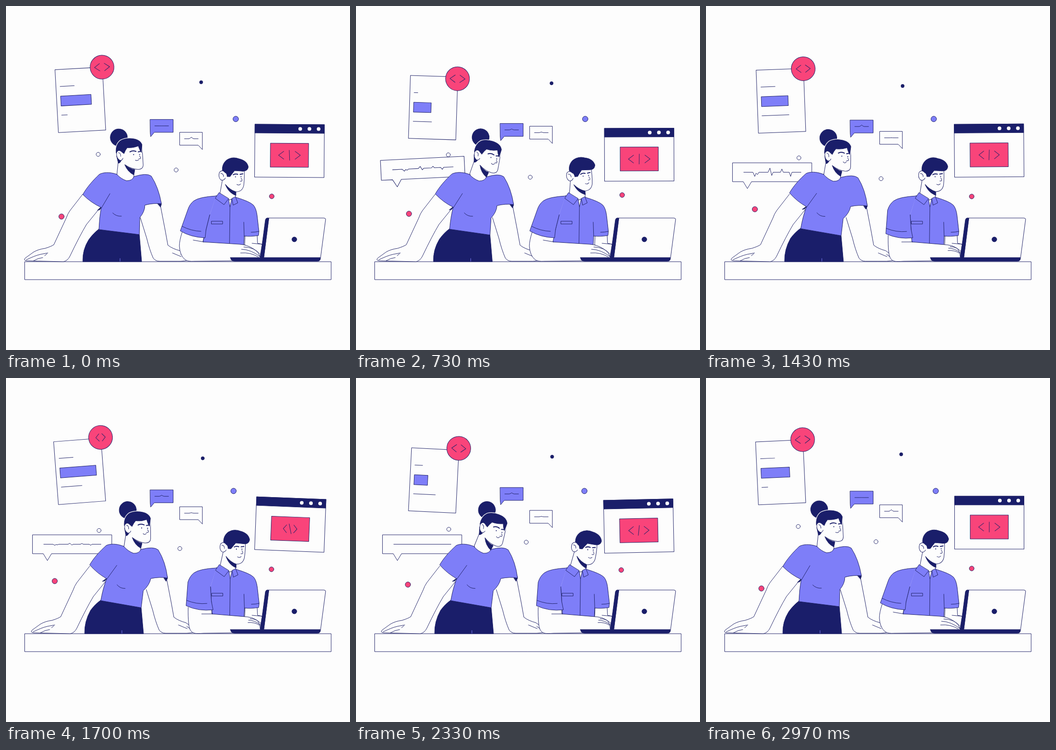
An HTML page with a canvas for the animation above (3010 ms loop, 748x748 px).

```html
<!DOCTYPE html>
<html lang="en">
<head>
<meta charset="utf-8">
<title>Team at work</title>
<style>
  html, body { margin: 0; width: 100%; height: 100%; overflow: hidden; background: #fdfdfd; }
  canvas { display: block; }
</style>
</head>
<body>
<canvas id="stage" width="748" height="748"></canvas>
<script>
const LOOP = 3010, TAU = Math.PI * 2;
const PAPER = '#fdfdfd', NAVY = '#1a1e6a', LINE = '#202368', VIOLET = '#7e7ef8', RED = '#f9447a';
const g = document.getElementById('stage').getContext('2d');
g.lineJoin = g.lineCap = 'round';
let t = 0;

// Timing: waves that fit the loop, and eased steps between two times.
const wave = (cycles, peak = 0) => Math.cos(TAU * cycles * (t - peak) / LOOP);
const clamp = u => Math.min(1, Math.max(0, u));
const smooth = u => (u = clamp(u), u * u * (3 - 2 * u));
const ramp = (from, to) => smooth((t - from) / (to - from));

// Moves every point of an absolute path.
const bend = (d, move) =>
  d.replace(/([\d.]+) ([\d.]+)/g, (_, x, y) => move(+x, +y).map(v => v.toFixed(2)).join(' '));

function draw(d, fill, stroke = LINE, width = 1) {
  const p = new Path2D(d);
  if (fill) { g.fillStyle = fill; g.fill(p); }
  if (stroke) { g.strokeStyle = stroke; g.lineWidth = width; g.stroke(p); }
}
const box = (x, y, w, h, fill) => draw(`M${x} ${y}h${w}v${h}h${-w}Z`, fill);
function dot(x, y, r, fill, stroke = LINE) {
  g.beginPath();
  g.arc(x, y, r, 0, TAU);
  g.fillStyle = fill;
  g.fill();
  if (stroke) { g.strokeStyle = stroke; g.lineWidth = 1; g.stroke(); }
}
function group(x, y, deg, scale, body) {
  g.save();
  g.translate(x, y);
  g.rotate(deg * Math.PI / 180);
  g.scale(scale, scale);
  body();
  g.restore();
}
const shift = (x, body) => group(x, 0, 0, 1, body);
const turn = (x, y, dx, dy, deg, body) =>
  group(x + dx, y + dy, deg, 1, () => { g.translate(-x, -y); body(); });

// Angle brackets that close and open four times per loop.
function brackets(inner, outer, y, h) {
  const s = .67 + .36 * wave(4);
  for (const k of [-s, s])
    draw(`M${inner * k} ${y - h}L${outer * k} ${y}L${inner * k} ${y + h}`);
}

function documentCard() {
  group(114, 281.7 - 7 * wave(2, 100), -.5 - 3.9 * wave(2, 200), 1, () => {
    box(0, -137, 103, 137, PAPER);
    draw(`M9 -100h${31 - 29 * Math.max(0, wave(2, 570))}`);
    box(9, -79, 51 + 28 * wave(2, 240), 21.5, VIOLET);
    draw(`M9 -37.5h${37 - 24.5 * wave(3)}`);
    g.translate(102.5, -137 + 4 * wave(1, LOOP / 4));
    dot(0, 0, 26, RED);
    brackets(5, 16, 0, 8);
  });
}

function browser() {
  const deg = 2.7 * wave(2, 340);
  group(616, 376.5 - 5 * wave(2, 1350), deg, 1, () => {
    box(-75.5, -115, 151, 115, PAPER);
    box(-75.5, -115, 151, 19, NAVY);
    for (const x of [23, 43, 63]) dot(x, -105.5, 4, PAPER, null);
    box(-41.5, -74, 83, 52, RED);
    brackets(12, 23, -48, 8.5);
    group(0, -48, -6 * deg, 1, () => draw('M0 -11V11'));
  });
}

function chat(x, y, outline, fill, bump) {
  const h = 3.5 * bump;
  group(x, y, 0, 1, () => {
    draw(outline, fill);
    draw(`M10 14H20Q23 ${14 - h / 3} 25 ${14 - h}Q27 ${14 - h / 3} 30 14H40`);
  });
}

function chats() {
  const swing = wave(1, LOOP / 4), bump = (1 - wave(3)) / 2;
  chat(313.5, 246.7 + 8.7 * swing, 'M0 0H50V28H9L1 37.5L0 28Z', VIOLET, bump);
  chat(378, 274.7 - 13.3 * swing, 'M0 0H49V37.5L40 28H0Z', PAPER, 1 - bump);
}

function pulseBubble() {
  const hump = Math.sin(Math.PI * clamp((t - 190) / 660));
  const size = (ramp(190, 380) - ramp(2380, 2600)) * (1 + .11 * hump);
  if (size < .01) return;
  const a = ramp(600, 880) - ramp(1500, 1800);
  group(144 + 2 * hump, 361.5 - 16 * hump, -5.2 * hump, size, () => {
    draw('M-86 -20.5H86V20.5H-45L-54 35.5L-63 20.5H-86Z', PAPER);
    g.beginPath();
    g.rect(-64, -15, 127 * ramp(200, 620), 30);
    g.clip();
    draw(`M-62 0H-42L-38 ${9 * a}L-35 ${2 * a}L-32 ${5 * a}L-29 0H-9L-5 ${-9 * a}`
      + `L-1 ${7 * a}L2 0H18L21 ${-7 * a}L24 0H37L40 ${9 * a}L43 0H63`);
  });
}

function drift(x, y, dx, dy, peak, r, fill) {
  const w = wave(1, peak);
  dot(x + dx * w, y + dy * w, r, fill);
}
function dots() {
  drift(426, 170, 1.8, 4.6, 1700, 3.6, NAVY);
  drift(497.3, 245.7, 2.5, 0, 200, 6, VIOLET);
  drift(577.7, 414.3, -1, 3.3, 2200, 5.2, RED);
  drift(113.3, 449.7, 7.5, 8.3, 100, 5.8, RED);
  drift(201.3, 326.7, 1, 5, 1800, 4.4, PAPER);
  drift(375, 365.5, 6.5, 11.5, 1180, 4.4, PAPER);
}

function eyes(points) {
  const shut = t > 370 && t < 510;
  for (const [x, y] of points) {
    if (shut) draw(`M${x - 4} ${y}Q${x} ${y + 1} ${x + 4} ${y - 1}`);
    else dot(x, y, 1.1, NAVY, null);
  }
}

function woman() {
  const p = ramp(150, 1580) - ramp(2350, 2800);
  // The torso leans above the waist and tilts a little.
  const lean = (x, y) => [
    x + p * (4 + 11 * smooth((490 - y) / 80)),
    y + (y < 520 ? p * .05 * (x - 240) : 0)
  ];
  const body = (d, fill, stroke) => draw(bend(d, lean), fill, stroke);
  const head = parts => turn(260, 370, 15 * p, 2 * p, 7 - 7 * wave(2, 100) + 3 * p, parts);

  shift(15 * p, () => {
    draw('M167 409L139 445Q134 452 131 461L104 519Q98 523 85 527Q70 529 60 535L42 548Q37 553 45 554L125 556Q134 554 139 544Q160 500 175 475L205 438', PAPER);
    draw('M44 552Q62 543 75 540L91 537M60 554Q70 548 80 547M84 543L89 539');
  });
  shift(13 * p, () => {
    draw('M335 430L346 487L352 520Q362 528 378 532L396 545L400 553L380 555L334 555Q325 555 320 548Q312 530 306 505L292 460', PAPER);
    draw('M362 537L381 545M380 540L394 550');
  });
  body('M199 444L208 436L204 443ZM330 430L337 426L338 431L336 437Z', NAVY);

  head(() => draw('M244 335L241 368L250 384H274L278 372V352', PAPER));

  body('M202 485L290 497L295 556L167 556Q166 530 180 508Q190 494 202 485Z', NAVY);
  body('M248 549L248 555', null, VIOLET);
  body('M241 366C225 360 210 362 203 366C190 378 175 395 167 410Q185 428 207 438Q203 460 202 486L290 497L291 460Q302 447 302 433Q320 428 338 430Q332 395 316 370Q306 362 278 371Q275 380 262 380Q250 376 241 366Z', VIOLET);
  body('M226 408L207 440M232 450Q240 458 251 457');

  head(() => {
    draw('M258 345Q268 354 280 356L278 367Q264 360 258 345Z', NAVY);
    dot(244.5, 286, 18.6, NAVY);
    draw('M244 310L290 300L295 305Q296 318 297 330L298 345Q298 355 286 355Q271 354 258 345L248 338Z', PAPER, null);
    draw('M295 305Q296 318 297 330L298 345Q298 355 286 355Q271 354 258 345');
    const hair = 'M239 320Q237 302 248 293Q258 287 272 288Q290 289 295 301L294 318Q290 313 287 304Q275 309 263 308Q259 313 256 321L252 318Q244 312 239 320Z';
    draw(hair, null, PAPER, 3.5);
    draw(hair, NAVY);
    draw('M240 326L244 342Q248 342 251 334Z', NAVY);
    draw('M253 319Q244 310 240 319Q239 332 248 336Q252 336 254 331', PAPER);
    draw('M244 319Q249 320 249 327');
    draw('M269 317Q275 313 282 316M287 317L293 315.5', null, NAVY, 2);
    eyes([[277, 323], [290, 323]]);
    draw('M290 326Q294 330 291 332H288');
    draw(`M281 335Q285 ${338.5 - 1.5 * wave(3)} 288 334`);
  });
}

function man() {
  const q = ramp(900, 1350) - ramp(2400, 2850);
  const deg = -5.8 * wave(1, LOOP / 4), sway = deg * .2;
  // The elbow draws in while the hand slides under the screen.
  const tuck = (x, y) => {
    if (x > 500 && y < 547) return [x + q * .35 * (556 - x), y + q * .35 * (522 - y)];
    const dx = q * smooth((520 - x) / 90) * 20 * clamp((y - 450) / 64);
    return [x + dx, Math.min(Math.max(y, 555), y + dx * .5 * smooth((430 - x) / 50))];
  };
  const arm = (d, fill) => draw(bend(d, tuck), fill);
  const head = parts => turn(482, 410, sway, 0, deg, parts);

  head(() => draw('M471 376L465 409L484 422L499 418V400', PAPER));
  draw('M520 497L519 519L552 547L557 518L547 516L546 497', PAPER);
  draw('M535 516L557 518');

  shift(sway, () => {
    draw(bend('M443 454L428 514', tuck) + 'L517 519L518 500Q530 502 549 499L550 490L546 455Q544 440 538 433Q530 425 500 416L491 419L487 437L484 419Q470 422 457 412', VIOLET);
    draw('M487 437L486 518M517 470L518 501M447 468H471V474H447ZM533 492Q542 492 550 490');
  });

  arm('M383 492Q377 510 377 522Q378 543 390 552Q396 556 410 555L495 554L553 548Q550 535 538 528Q524 519 508 518L428 513L431 500', PAPER);
  arm('M407 509L430 513M512 529Q532 529 554 546M510 537Q532 535 549 546M517 524Q540 524 554 541');

  shift(sway, () => {
    arm('M457 413Q420 415 408 424Q399 431 395 444L379 489Q402 503 433 504L435 486L443 454', VIOLET);
    arm('M383 479Q402 489 424 490');
    draw('M463 406L455 418L474 432L484 419ZM491 419L494 433L504 428L499 415Z', VIOLET);
  });

  head(() => {
    draw('M477 388Q486 400 500 404V412Q484 406 477 388Z', NAVY);
    draw('M474 358L518 354Q520 372 517 390Q514 404 500 404Q487 400 477 388Z', PAPER, null);
    draw('M518 357Q519 372 517 390Q514 404 500 404Q487 400 477 388');
    draw('M471 361Q468 345 480 335Q492 327 506 332Q524 336 527 350Q525 361 512 359L497 358Q493 363 487 371L481 371Q480 360 471 361Z', NAVY);
    draw('M477 363Q470 354 464 362Q461 372 467 378Q473 381 477 374', PAPER);
    draw('M467 364Q473 364 473 371');
    draw('M494 367Q498 364 504 366M509 366L515 365', null, NAVY, 2);
    eyes([[499, 371.5], [511, 371]]);
    draw('M511 374Q515 379 512 381H509');
    const open = t > 1800 && t < 2150;
    draw(`M502 388Q507 ${open ? 396 : 391} 510 387${open ? 'Z' : ''}`);
  });
}

function laptop() {
  draw('M488 547H684Q684 555 677 555H497Q489 555 488 547Z', NAVY);
  draw('M568 461H572L561 548H553L564 465Q565 461 568 461Z', NAVY);
  draw('M572 461H691Q695 461 695 464L684 547H561Z', PAPER);
  dot(627, 507.5, 5.3, NAVY);
}

function frame(now) {
  t = now % LOOP;
  g.fillStyle = PAPER;
  g.fillRect(0, 0, 748, 748);
  documentCard();
  browser();
  chats();
  dots();
  pulseBubble();
  box(41, 556, 666, 39, PAPER);
  woman();
  man();
  laptop();
}

const start = performance.now();
(function tick() {
  frame(performance.now() - start);
  requestAnimationFrame(tick);
})();
</script>
</body>
</html>
```
